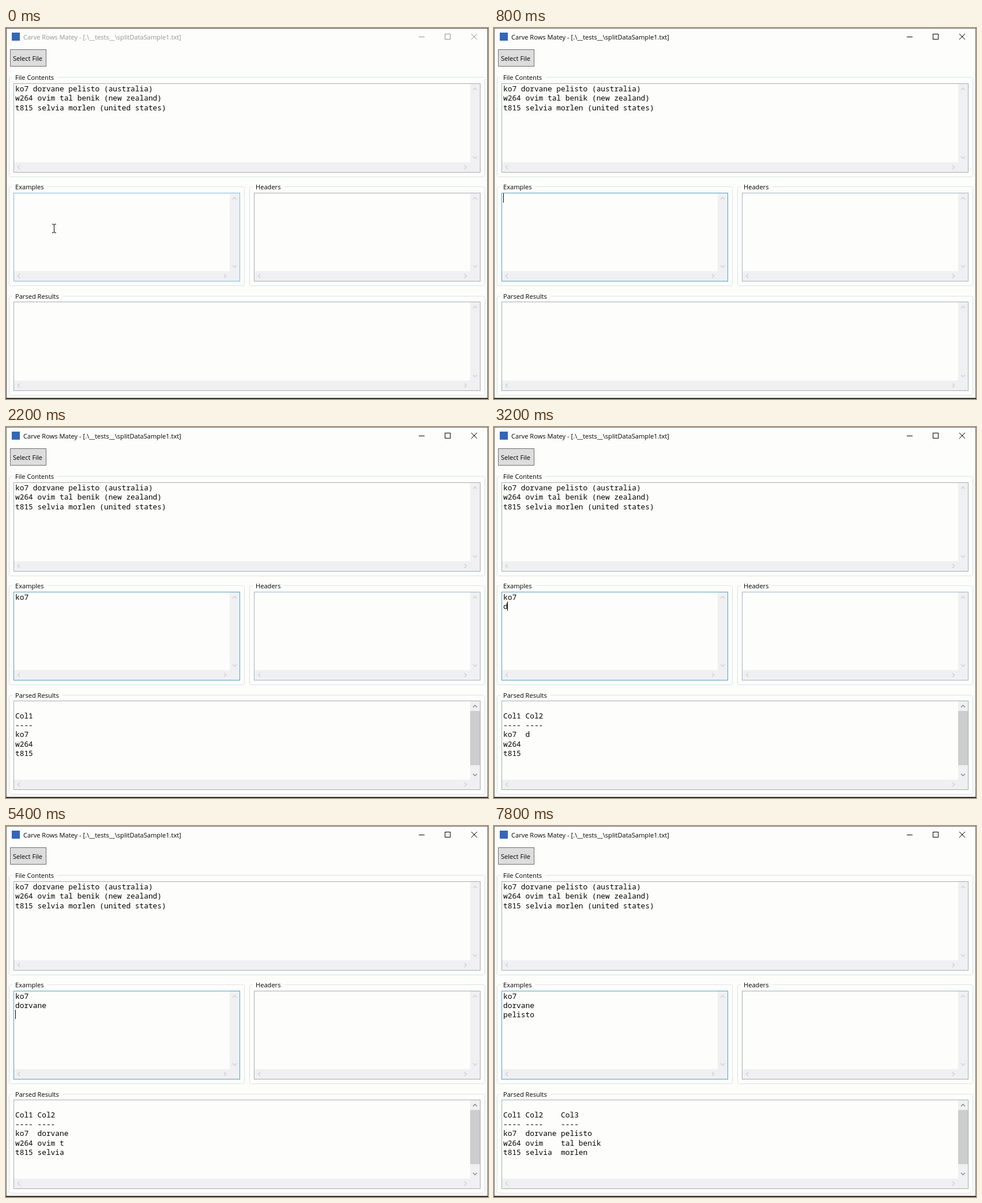
These frames come from a looping animation (836 px wide and 644 px high, 8000 ms). An HTML page with a canvas:

```html
<!DOCTYPE html>
<html>
<head>
<meta charset="utf-8">
<style>
html, body { margin: 0; width: 100%; height: 100%; overflow: hidden; background: #fdfefc; }
canvas { display: block; }
</style>
</head>
<body>
<canvas id="stage" width="836" height="644"></canvas>
<script>
const ctx = document.getElementById("stage").getContext("2d");
const LOOP = 8000;
const UI = '11.1px "Open Sans", "Noto Sans", sans-serif';
const MONO = '12.83px "Noto Sans Mono", "DejaVu Sans Mono", monospace';
const PAPER = "#fdfefc", BAR = "#f0f0f2", FAINT = "#d2d2d6", EDGE = "#a9abb0";
const CHAR = 7.7, LINE = 16.3;

const people = [
  ["ko7", "dorvane", "pelisto", "australia"],
  ["w264", "ovim", "tal benik", "new zealand"],
  ["t815", "selvia", "morlen", "united states"]
];
const fileLines = people.map(([id, first, last, land]) => `${id} ${first} ${last} (${land})`);
const script = people[0].slice(0, 3).join("\n") + "\n";

// [time, characters typed, caret index or -1 when hidden]
const keys = [
  [0, 0, -1], [200, 0, 0], [600, 0, -1], [800, 0, 0],
  [1200, 1, 1], [1400, 2, 2], [1800, 3, 3], [2200, 3, -1],
  [2600, 4, 4], [3000, 5, 5], [3400, 6, 5], [3600, 6, 6],
  [4000, 7, 6], [4200, 8, 7], [4400, 9, 8], [4600, 10, 9], [4800, 11, 10], [5000, 11, 11],
  [5400, 12, 12], [5600, 13, 13],
  [6000, 14, 13], [6200, 15, 14], [6400, 16, 15], [6600, 17, 16], [6800, 18, 17], [7000, 19, 19],
  [7200, 20, -1], [7600, 20, 20], [7800, 20, -1]
];

function text(str, x, y, font, color = "#000") {
  ctx.font = font;
  ctx.fillStyle = color;
  ctx.fillText(str, x, y);
}

function lines(list, x, y, phase = 0) {
  list.forEach((str, i) => text(str, x, y + Math.floor(phase + i * LINE), MONO));
}

function fill(x, y, w, h, color) {
  ctx.fillStyle = color;
  ctx.fillRect(x, y, w, h);
}

function frame(x, y, w, h, color) {
  ctx.strokeStyle = color;
  ctx.lineWidth = 1;
  ctx.strokeRect(x + 0.5, y + 0.5, w - 1, h - 1);
}

function path(points, color, width = 1) {
  ctx.strokeStyle = color;
  ctx.lineWidth = width;
  ctx.beginPath();
  points.forEach(([x, y]) => ctx.lineTo(x, y));
  ctx.stroke();
}

function chevron(x, y, dx, dy, color) {
  const tip = s => [x - dx * 1.5 + dy * s, y - dy * 1.5 + dx * s];
  path([tip(-3.5), [x + dx * 2, y + dy * 2], tip(3.5)], color, 1.5);
}

function group(label, x, y, w, h) {
  ctx.strokeStyle = "#dce1e4";
  ctx.lineWidth = 1;
  ctx.beginPath();
  ctx.roundRect(x + 0.5, y + 0.5, w - 1, h - 1, 3);
  ctx.stroke();
  ctx.font = UI;
  fill(x + 6, y - 3, ctx.measureText(label).width + 11, 8, PAPER);
  text(label, x + 11, y + 5, UI);
}

function textBox(x, y, w, h, edge, scrollable = false) {
  const right = x + w - 18, bottom = y + h - 18;
  fill(right, y + 1, 17, h - 2, BAR);
  fill(x + 1, bottom, w - 2, 17, BAR);
  const arrow = scrollable ? "#8c8c90" : FAINT;
  chevron(right + 8.5, y + 10, 0, -1, arrow);
  chevron(right + 8.5, bottom - 8.5, 0, 1, arrow);
  chevron(x + 9.5, bottom + 8.5, -1, 0, FAINT);
  chevron(right - 8.5, bottom + 8.5, 1, 0, FAINT);
  if (scrollable) fill(right, y + 18, 17, 94, "#cdcdcd");
  frame(x, y, w, h, edge);
}

function titleBar(active) {
  const ink = active ? "#000" : "#929292";
  fill(10, 8, 14, 14, "#3467b8");
  text("Carve Rows Matey - [.\\__tests__\\splitDataSample1.txt]", 30, 20, UI, ink);
  fill(716, 15, 10, 1, ink);
  frame(761, 10, 10, 10, ink);
  path([[807, 10], [817, 20]], ink);
  path([[817, 10], [807, 20]], ink);
}

function pointer(x, y) {
  path([[x - 3, y - 7.5], [x - 1, y - 7.5], [x + 0.5, y - 6.5], [x + 2, y - 7.5], [x + 4, y - 7.5]], "#000");
  path([[x + 0.5, y - 7], [x + 0.5, y + 7]], "#000");
  path([[x - 3, y + 7.5], [x - 1, y + 7.5], [x + 0.5, y + 6.5], [x + 2, y + 7.5], [x + 4, y + 7.5]], "#000");
}

// Guess each column for the other rows from the partially typed example.
function parse(parts) {
  const [a, b = "", c = ""] = parts.map(p => p.length);
  return people.map(([id, first, last], row) => {
    if (row === 0) return parts;
    const name = `${first} ${last}`;
    const code = a === people[0][0].length ? id : id.slice(0, a - 1);
    if (c === people[0][2].length) return [code, first, last];
    return [code, name.slice(0, Math.max(0, b - 1)), name.slice(7, 7 + c)];
  });
}

function resultTable(typed) {
  const parts = typed.split("\n").filter(Boolean);
  const rows = parse(parts);
  const widths = parts.map((_, i) => Math.max(4, ...rows.map(r => r[i].length)));
  const join = cells => widths.map((w, i) => cells[i].padEnd(w)).join(" ");
  const head = parts.map((_, i) => "Col" + (i + 1));
  return ["", join(head), join(parts.map(() => "----")), ...rows.map(join)];
}

function draw(t) {
  const [, count, caret] = keys.filter(k => k[0] <= t).pop();
  const typed = script.slice(0, count);
  const active = t >= 200;

  fill(0, 0, 836, 644, PAPER);
  titleBar(active);

  fill(7, 37, 63, 30, "#dddddd");
  frame(7, 37, 63, 30, "#707070");
  text("Select File", 12, 57, UI);

  group("File Contents", 5, 85, 826, 174);
  textBox(13, 96, 810, 155, EDGE);
  lines(fileLines, 16, 110, 0.4);

  group("Examples", 5, 275, 409, 173);
  textBox(13, 286, 393, 154, active ? "#589fc0" : "#82b8da");
  lines(typed.split("\n"), 16, 300);

  group("Headers", 422, 275, 409, 173);
  textBox(430, 286, 393, 154, active && t < 4000 ? "#a5b1c0" : EDGE);

  group("Parsed Results", 5, 465, 826, 173);
  textBox(13, 475, 810, 155, EDGE, count > 0);
  if (count) lines(resultTable(typed), 16, 490);

  if (caret >= 0) {
    const before = script.slice(0, caret).split("\n");
    const row = before.length - 1;
    fill(16 + Math.floor(before[row].length * CHAR), 287 + Math.floor(row * LINE), 1, 16, "#000");
  }
  if (t < 800) pointer(83, 348);

  frame(0, 0, 836, 643, active ? "#6c6c6c" : "#484848");
  fill(0, 642, 836, 2, "#343434");
}

function tick(now) {
  draw(now % LOOP);
  requestAnimationFrame(tick);
}
requestAnimationFrame(tick);
</script>
</body>
</html>
```
